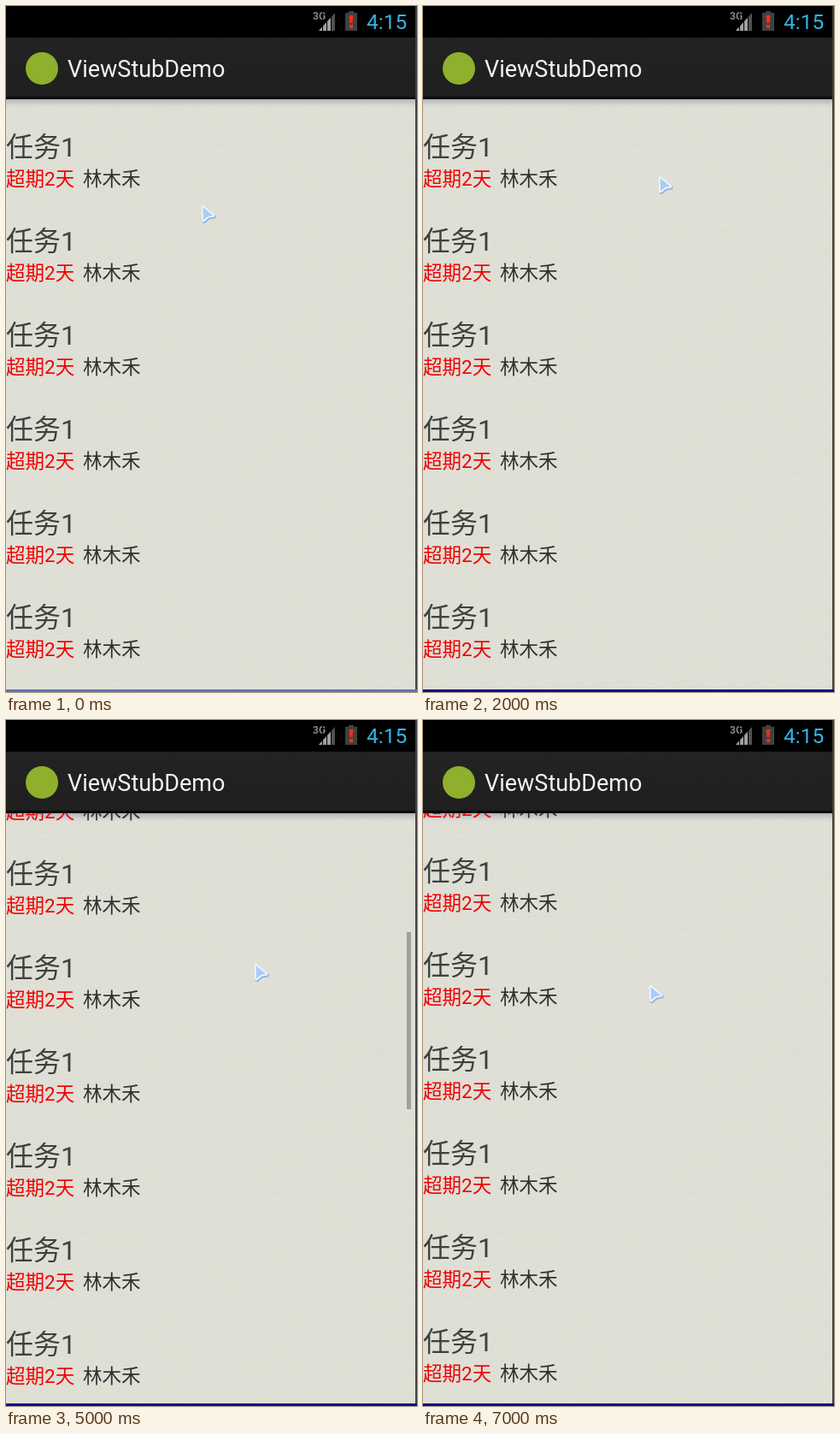
An HTML page with a canvas for the animation above (8000 ms loop, 481 by 802 pixels).

```html
<!DOCTYPE html>
<html lang="zh-CN">
<head>
<meta charset="utf-8">
<style>
html, body { margin: 0; width: 100%; height: 100%; overflow: hidden; background: #000; }
canvas { display: block; }
</style>
</head>
<body>
<canvas id="stage" width="481" height="802"></canvas>
<script>
const W = 481, H = 802, LOOP = 8000;
const SCREEN_W = 479, LIST_TOP = 109, LIST_BOTTOM = 799, ROW = 110, PANEL = 104;
const FONT = 'Roboto, "Noto Sans CJK SC", "Noto Sans CJK", sans-serif';
const ctx = document.getElementById('stage').getContext('2d');

// Each step holds until the next one; "open" is the row with its panel shown.
const steps = [
  { at: 0, cursor: [228, 232], edge: '#6070b8' },
  { at: 500, cursor: [275, 179] },
  { at: 1000, cursor: [275, 179], open: 0 },
  { at: 2000, cursor: [275, 198] },
  { at: 3000, cursor: [282, 304] },
  { at: 3500, cursor: [280, 196] },
  { at: 4000, cursor: [297, 389], shift: 20, thumb: 177 },
  { at: 4500, cursor: [282, 290], shift: 20 },
  { at: 5000, cursor: [290, 284], shift: 15, thumb: 248 },
  { at: 5500, cursor: [260, 317], shift: 12 },
  { at: 6000, cursor: [264, 309], shift: 12 },
  { at: 6500, cursor: [264, 309], shift: 12, open: 1 },
  { at: 7000, cursor: [264, 309], shift: 12 }
];

const icons = [
  'M30 279 L35 274 L41 280 L60 262 L66 267 L42 292 Z',
  'M131 260 Q136 255 141 260 L138 283 H134 Z M132 291 a4 4 0 1 0 8 0 a4 4 0 1 0 -8 0 Z ' +
  'M147 260 Q152 255 157 260 L154 283 H150 Z M148 291 a4 4 0 1 0 8 0 a4 4 0 1 0 -8 0 Z',
  'M221 289 Q227 284 227 273 Q227 257 239 257 Q251 257 251 273 Q251 284 257 289 Z ' +
  'M232 290 H246 Q245 295 239 295 Q233 295 232 290 Z',
  'M336 292 L320 277 C313 269 319 261 326 262 Q333 262 336 268 Q339 262 346 262 C353 261 359 269 352 277 Z',
  'M416 277 a6 6 0 0 1 10 -4 L436 266 a6 6 0 1 1 2 3 L428 276 V279 L438 286 a6 6 0 1 1 -2 3 L426 281 a6 6 0 0 1 -10 -4 Z'
].map(d => new Path2D(d));
const arrow = new Path2D('M2.5 3 L14.5 13 L8.5 14 L3 18.5 Z');

function rect(color, x, y, w, h) {
  ctx.fillStyle = color;
  ctx.fillRect(x, y, w, h);
}

function text(str, x, y, size, color, weight = 400) {
  ctx.font = `${weight} ${size}px ${FONT}`;
  ctx.fillStyle = color;
  ctx.fillText(str, x, y);
}

function polygon(color, ...points) {
  ctx.fillStyle = color;
  ctx.beginPath();
  points.forEach(([x, y]) => ctx.lineTo(x, y));
  ctx.fill();
}

function fillAt(path, dx, dy, color) {
  ctx.save();
  ctx.translate(dx, dy);
  ctx.fillStyle = color;
  ctx.fill(path);
  ctx.restore();
}

function outline(path, color, width) {
  ctx.strokeStyle = color;
  ctx.lineWidth = width;
  ctx.stroke(path);
}

function makePaper() {
  const paper = document.createElement('canvas');
  paper.width = W;
  paper.height = H;
  const p = paper.getContext('2d');
  let seed = 7;
  const random = () => (seed = (seed * 16807) % 2147483647) / 2147483647;
  p.fillStyle = '#dfdfd5';
  p.fillRect(0, 0, W, H);
  const tints = ['#dddddb', '#e1e1d4', '#dedecd', '#dcdcdc'];
  for (let y = LIST_TOP; y < LIST_BOTTOM; y += 3) {
    for (let x = -random() * 20; x < W; x += 5 + random() * 22) {
      p.fillStyle = tints[Math.floor(random() * tints.length)];
      p.fillRect(x, y + Math.floor(random() * 3), 3 + random() * 10, 1);
    }
  }
  const shade = p.createLinearGradient(0, LIST_TOP, 0, LIST_TOP + 10);
  shade.addColorStop(0, '#b4b4b8');
  shade.addColorStop(0.5, '#cdcdce');
  shade.addColorStop(1, 'rgba(215,215,212,0)');
  p.fillStyle = shade;
  p.fillRect(0, LIST_TOP, W, 10);
  return paper;
}
const paper = makePaper();

function drawStatus() {
  rect('#000', 0, 0, W, 37);
  text('3G', 359, 16, 12, '#858585', 700);
  polygon('#505050', [366, 29], [386, 7], [386, 29]);
  polygon('#a0a0a0', [366, 29], [381, 12.5], [381, 29]);
  for (let x = 370; x < 386; x += 5) rect('#000', x, 6, 1, 24);
  rect('#404040', 401, 6, 6, 3);
  rect('#404040', 397, 8, 14, 21);
  polygon('#ee3018', [401.5, 11], [406.5, 11], [405.5, 20], [402.5, 20]);
  rect('#ee3018', 402, 22, 4, 4);
  text('4:15', 422, 27, 24.5, '#33b5e5');
}

function drawActionBar() {
  const fill = ctx.createLinearGradient(0, 37, 0, 106);
  fill.addColorStop(0, '#232323');
  fill.addColorStop(1, '#1f1f1f');
  rect(fill, 0, 37, W, 69);
  rect('#0b0b0b', 0, 106, W, 3);
  ctx.fillStyle = '#8fb02c';
  ctx.beginPath();
  ctx.arc(42, 73, 19, 0, Math.PI * 2);
  ctx.fill();
  text('ViewStubDemo', 72, 83, 27, '#f2f2f2');
}

function drawRow(y) {
  text('任务1', 0, y + 176, 32, '#404040');
  text('超期2天', 0, y + 210, 22.5, '#f00000');
  text('林木禾', 90, y + 210, 22.5, '#303030');
}

function drawPanel(y) {
  ctx.save();
  ctx.translate(0, y);
  rect('#eeeeee', 0, 218, SCREEN_W, 16);
  polygon('#d2d2cb', [225, 234], [239, 220], [253, 234]);
  rect('#d0d0bd', 0, 234, SCREEN_W, 27);
  rect('#cfbfc0', 0, 261, SCREEN_W, 10);
  rect('#c0c0c2', 0, 271, SCREEN_W, 10);
  rect('#bfbfad', 0, 281, SCREEN_W, 39);
  rect('#ada3a3', 0, 320, SCREEN_W, 2);
  rect('#dedbd2', 0, 234, 1, 86);
  rect('#dedbd2', 478, 234, 1, 86);
  for (const icon of icons) {
    fillAt(icon, 0.5, 1.3, '#efefed');
    fillAt(icon, -0.3, -1, '#777773');
    fillAt(icon, 0.2, 0.3, '#bdbdbd');
  }
  ctx.restore();
}

function drawList({ shift = 0, open = Infinity, thumb }) {
  ctx.save();
  ctx.beginPath();
  ctx.rect(0, LIST_TOP, SCREEN_W, LIST_BOTTOM - LIST_TOP);
  ctx.clip();
  for (let i = -1; i < 7; i++) {
    const y = shift + i * ROW + (i > open ? PANEL : 0);
    drawRow(y);
    if (i === open) drawPanel(y);
  }
  if (thumb) rect('#a0a09e', 469, thumb, 5, 207);
  ctx.restore();
}

function drawCursor([x, y]) {
  ctx.save();
  ctx.translate(x, y);
  ctx.lineJoin = 'round';
  ctx.save();
  ctx.translate(0.8, 1.2);
  outline(arrow, '#8fb2ea', 4.6);
  ctx.restore();
  outline(arrow, '#f0f6ff', 3.6);
  ctx.fillStyle = '#a9cdf5';
  ctx.fill(arrow);
  ctx.restore();
}

function draw(time) {
  const step = steps.findLast(s => s.at <= time % LOOP);
  ctx.drawImage(paper, 0, 0);
  drawStatus();
  drawActionBar();
  drawList(step);
  rect('#404044', SCREEN_W, 0, W - SCREEN_W, LIST_BOTTOM);
  rect(step.edge || '#0a0a98', 0, LIST_BOTTOM, W, H - LIST_BOTTOM);
  drawCursor(step.cursor);
}

const start = performance.now();
function tick() {
  draw(performance.now() - start);
  requestAnimationFrame(tick);
}
tick();
</script>
</body>
</html>
```
